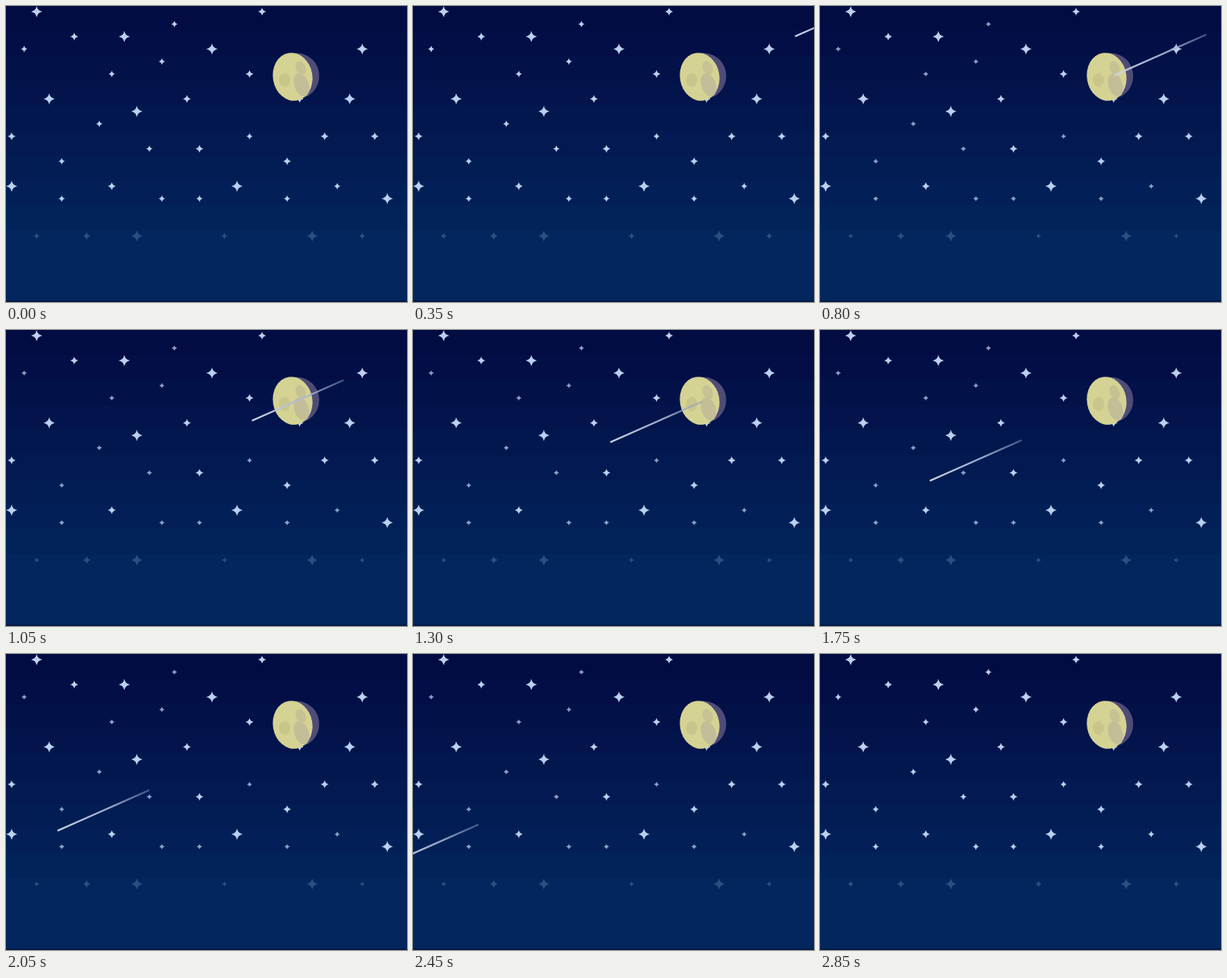
These frames come from a looping animation (498 by 368 pixels, 2.9 s). An HTML page with a canvas:

```html
<!DOCTYPE html>
<html>
<head>
<meta charset="utf-8">
<title>Night sky</title>
<style>
html, body { margin: 0; width: 100%; height: 100%; overflow: hidden; background: #021a54; }
canvas { display: block; }
</style>
</head>
<body>
<canvas id="sky" width="498" height="368"></canvas>
<script>
const ctx = document.getElementById('sky').getContext('2d');
const LOOP = 2900, STEP = 50;
const CELL = 15.55, BAND = 31, TAIL = 114, HAZE_ROW = 18;

// Stars sit on a square grid: "column,row" by size.
const stars = [
  { r: 7, at: '2,0 16,3 28,3 9,2 3,7 27,7 10,8 0,14 18,14 30,15 10,18 24,18' },
  { r: 5, at: '20,0 5,2 19,5 14,7 23,7 0,10 25,10 29,10 15,11 22,12 8,14 6,18' },
  { r: 4.2, twinkles: true, at: '13,1 1,3 12,4 8,5 7,9 19,10 11,11 4,12 26,14 4,15 12,15 15,15 22,15 2,18 17,18 28,18' }
];

function background() {
  for (let i = 0; i * BAND < 368; i++) {
    const k = Math.min(1, i / 9);
    ctx.fillStyle = `rgb(2, ${Math.round(11 + 27 * k)}, ${Math.round(66 + 27 * k)})`;
    ctx.fillRect(0, i * BAND, 498, BAND);
  }
  ctx.fillStyle = '#021b48';
  ctx.fillRect(0, 366, 498, 2);
}

function star(x, y, r) {
  const c = r * 0.17;
  ctx.beginPath();
  ctx.moveTo(x, y - r);
  ctx.quadraticCurveTo(x + c, y - c, x + r, y);
  ctx.quadraticCurveTo(x + c, y + c, x, y + r);
  ctx.quadraticCurveTo(x - c, y + c, x - r, y);
  ctx.quadraticCurveTo(x - c, y - c, x, y - r);
  ctx.fill();
}

function starfield(t) {
  const dimmed = t >= 600 && t < 2600;
  ctx.fillStyle = '#b9d0ef';
  for (const { r, twinkles, at } of stars) {
    const dim = twinkles && dimmed;
    for (const cell of at.split(' ')) {
      const [col, row] = cell.split(',').map(Number);
      ctx.globalAlpha = row === HAZE_ROW ? 0.24 : dim ? 0.75 : 1;
      star(7 + col * CELL, 7 + row * 15.5, dim ? r * 0.8 : r);
    }
  }
  ctx.globalAlpha = 1;
}

function blob(x, y, rx, ry, color, tilt = 0) {
  ctx.fillStyle = color;
  ctx.beginPath();
  ctx.ellipse(x, y, rx, ry, tilt, 0, 2 * Math.PI);
  ctx.fill();
}

function moon() {
  blob(361, 87, 28, 28.5, '#4f4c78');
  blob(356, 88, 24.5, 30, '#d5d393', -0.17);
  blob(367, 98, 9, 15, '#c3be98', -0.3);
  blob(366, 77, 6, 9, '#c6c293', -0.4);
  blob(346, 92, 7, 9, '#c9c68c');
}

function meteor(t) {
  const lineY = x => 248 - 0.443 * x;
  const x = 559 - 0.2415 * t, end = x + TAIL;
  const fade = ctx.createLinearGradient(x, 0, end, 0);
  fade.addColorStop(0, '#ccd5e6');
  fade.addColorStop(0.6, 'rgba(168, 182, 212, .9)');
  fade.addColorStop(1, 'rgba(130, 148, 190, .5)');
  ctx.strokeStyle = fade;
  ctx.lineWidth = 2.2;
  ctx.beginPath();
  ctx.moveTo(x, lineY(x));
  ctx.lineTo(end, lineY(end));
  ctx.stroke();
}

function draw(t) {
  background();
  starfield(t);
  moon();
  meteor(t);
}

const start = performance.now();
function tick() {
  const t = (performance.now() - start) % LOOP;
  draw(Math.floor(t / STEP) * STEP);
  requestAnimationFrame(tick);
}
tick();
</script>
</body>
</html>
```
